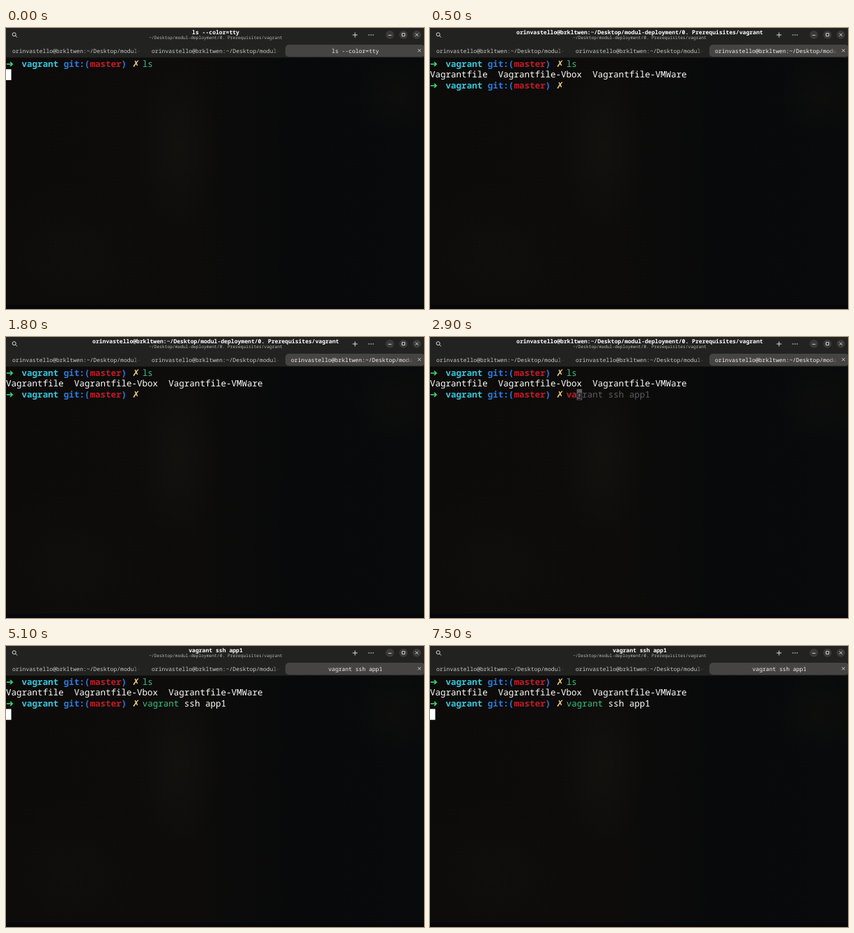
Write an HTML page that moves like this. It is 600x404 px and loops after 8 s.

```html
<!DOCTYPE html>
<html lang="en">
<head>
<meta charset="utf-8">
<title>Terminal session</title>
<style>
  html, body { margin: 0; width: 100%; height: 100%; overflow: hidden; background: #0a0a0a; }
  svg { display: block; width: 600px; height: 404px; }
  text { font-family: "Noto Sans Mono", "DejaVu Sans Mono", monospace; white-space: pre; text-rendering: geometricPrecision; }
  .term { font-size: 12.54px; }
  .sign { font-family: "DejaVu Sans", sans-serif; font-size: 13px; }
  .title, .tab { font-size: 8.08px; }
  .sub { font-size: 6.27px; }
  .bold { font-weight: 700; }
  .mid { text-anchor: middle; }
</style>
</head>
<body>
<svg id="stage" viewBox="0 0 600 404" xmlns="http://www.w3.org/2000/svg">
  <defs>
    <linearGradient id="wall">
      <stop offset="0" stop-color="#0c0b0a"/>
      <stop offset=".45" stop-color="#0d0c0b"/>
      <stop offset=".7" stop-color="#08090a"/>
      <stop offset="1" stop-color="#090a0b"/>
    </linearGradient>
    <radialGradient id="glow">
      <stop offset="0" stop-color="#12110e"/>
      <stop offset="1" stop-color="#12110e" stop-opacity="0"/>
    </radialGradient>
  </defs>
  <rect width="600" height="404" fill="url(#wall)"/>
  <ellipse cx="245" cy="170" rx="60" ry="130" fill="url(#glow)"/>
  <ellipse cx="90" cy="330" rx="130" ry="110" fill="url(#glow)" opacity=".5"/>
  <ellipse cx="560" cy="95" rx="60" ry="60" fill="url(#glow)" opacity=".5"/>
  <rect y="398" width="600" height="6" fill="#05070b"/>
  <rect width="600" height="42.5" fill="#222221"/>
  <rect x="401" y="24" width="200" height="17.5" rx="5" fill="#454443"/>

  <!-- header icons -->
  <g fill="none" stroke="#dedddb" stroke-width="1">
    <circle cx="11.7" cy="9.2" r="2.5"/>
    <path d="M13.6 11.1L16 13.5M497.5 10h7M501 6.5v7"/>
  </g>
  <g fill="#dedddb">
    <circle cx="521" cy="10" r=".8"/><circle cx="524" cy="10" r=".8"/><circle cx="527" cy="10" r=".8"/>
  </g>
  <g fill="#3b3a39">
    <circle cx="551" cy="9.7" r="6"/><circle cx="570.5" cy="9.7" r="6"/><circle cx="589.7" cy="9.7" r="6"/>
  </g>
  <path d="M548.7 10.4h4.6M568.5 7.7h4v4h-4zM587.6 7.6l4.2 4.2m0-4.2l-4.2 4.2M591.4 30.4l4 4m0-4l-4 4"
    fill="none" stroke="#dedddb" stroke-width=".9"/>
</svg>
<script>
const NS = "http://www.w3.org/2000/svg";
const stage = document.getElementById("stage");
const LOOP = 8000, COL = 7.525, ROW = 15.65, TOP = 43.6;
const RED = "#c01c28", GREEN = "#33c481", BLUE = "#2a7bde", CYAN = "#33c7de",
      WHITE = "#ffffff", GREY = "#5e5c64", DARK = "#0b0b0b";

const user = "orinvastello@brkltwen";
const path = "~/Desktop/modul-deployment/0. Prerequisites/vagrant";
const shell = user + ":" + path;
const command = "vagrant ssh app1";

function add(tag, attrs, str = "", parent = stage) {
  const el = document.createElementNS(NS, tag);
  for (const key in attrs) el.setAttribute(key, attrs[key]);
  el.textContent = str;
  return parent.appendChild(el);
}

const rowTop = row => TOP + row * ROW;
const show = (el, on) => el.setAttribute("visibility", on ? "visible" : "hidden");

function put(col, row, str, fill, cls = "", parent = stage) {
  return add("text", { x: col * COL, y: rowTop(row) + 12, fill, class: "term " + cls }, str, parent);
}

function prompt(row) {
  const g = add("g", {});
  put(0, row, "➜", "#33da7a", "sign bold", g);
  put(3, row, "vagrant", CYAN, "bold", g);
  put(11, row, "git:(", BLUE, "bold", g);
  put(16, row, "master", RED, "bold", g);
  put(22, row, ")", BLUE, "bold", g);
  put(24.1, row, "✗", "#edd06a", "sign bold", g);
  return g;
}

// Text fill that fades out at the right edge of a tab
function fade(id, end, color) {
  const grad = add("linearGradient", { id, gradientUnits: "userSpaceOnUse", x1: end - 13, x2: end, y1: 0, y2: 0 });
  add("stop", { offset: 0, "stop-color": color }, "", grad);
  add("stop", { offset: 1, "stop-color": color, "stop-opacity": 0 }, "", grad);
  return `url(#${id})`;
}

function tabText(x, id, end, color) {
  return add("text", { x, y: 35.6, class: "tab", fill: fade(id, end, color) }, shell);
}

tabText(9, "fadeA", 194, "#c9c8c6");
tabText(209, "fadeB", 394, "#c9c8c6");
const longTab = tabText(409, "fadeC", 584, "#f0f0ef");
const shortTab = add("text", { x: 501.5, y: 35.6, class: "tab mid", fill: "#f0f0ef" });
const title = add("text", { x: 301, y: 9, class: "title bold mid", fill: WHITE });
add("text", { x: 301, y: 16.4, class: "sub mid", fill: "#b5b4b2" }, path);

prompt(0);
put(26, 0, "ls", GREEN);
const files = ["Vagrantfile", "Vagrantfile-Vbox", "Vagrantfile-VMWare"];
const listing = [0, 13, 31].map((col, i) => put(col, 1, files[i], WHITE));
const output = [...listing, prompt(2)];
const mark = add("rect", { x: 0, y: rowTop(1), height: ROW, fill: WHITE });
const marked = put(0, 1, "", DARK);

const typed = put(26, 2, "", RED, "bold");
const ghost = put(26, 2, "", GREY);
const done = [put(26, 2, "vagrant", GREEN), put(34, 2, "ssh app1", WHITE)];
const cursor = add("rect", { width: COL, height: ROW });
const under = put(26, 2, "", DARK);

// Each table holds [start time, value]
const titles = [[0, "ls --color=tty"], [100, shell], [4000, command]];
const picks = [[0, 0], [1300, 4], [1400, 8], [1500, 11], [1800, 0]];
const keys = [[0, 0], [2700, 1], [2900, 2], [3000, 3], [3100, 4], [3200, 5], [3600, 16]];
const blinks = [[0, 1], [500, 0], [1100, 1], [1700, 0], [2300, 1],
  [4500, 0], [5100, 1], [5700, 0], [6300, 1], [6900, 0], [7500, 1]];

const at = (table, t) => table.filter(step => step[0] <= t).pop()[1];

function draw(t) {
  const name = at(titles, t), isShell = name === shell;
  title.textContent = name;
  shortTab.textContent = isShell ? "" : name;
  show(longTab, isShell);
  output.forEach(el => show(el, t >= 100));

  const pick = at(picks, t);
  mark.setAttribute("width", pick * COL);
  marked.textContent = files[0].slice(0, pick);

  const n = at(keys, t), full = n === command.length;
  const hint = t >= 2800 && n > 0 && !full;
  typed.textContent = full ? "" : command.slice(0, n);
  ghost.textContent = hint ? command.slice(n + 1) : "";
  ghost.setAttribute("x", (27 + n) * COL);
  done.forEach(el => show(el, full));

  const running = !isShell;
  const col = running ? 0 : 26 + n;
  const row = t < 100 ? 1 : running ? 3 : 2;
  cursor.setAttribute("x", col * COL);
  cursor.setAttribute("y", rowTop(row));
  cursor.setAttribute("fill", hint ? GREY : WHITE);
  show(cursor, at(blinks, t));
  under.setAttribute("x", col * COL);
  under.textContent = hint ? command[n] : "";
}

const start = performance.now();
function tick() {
  draw((performance.now() - start) % LOOP);
  requestAnimationFrame(tick);
}
tick();
</script>
</body>
</html>
```
